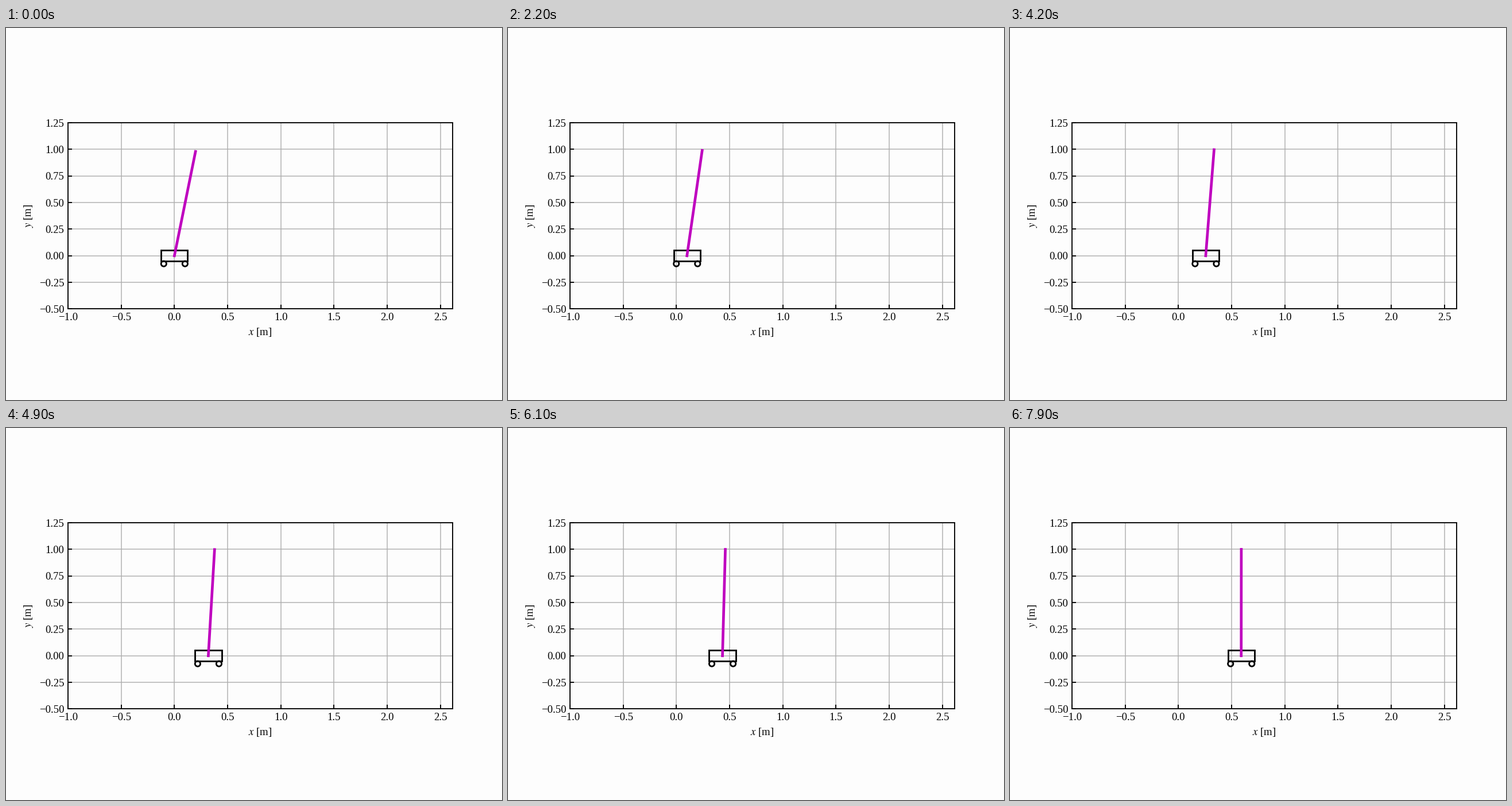
A matplotlib script that plays this animation: 864 px wide and 648 px high, repeating every 8 s.

```python
import numpy as np
import matplotlib.pyplot as plt
from matplotlib.animation import FuncAnimation
from matplotlib.patches import Circle, Rectangle

plt.rcParams.update({
    "font.family": "Liberation Serif",
    "mathtext.fontset": "stix",
    "font.size": 10,
    "axes.linewidth": 1.0,
    "xtick.direction": "in",
    "ytick.direction": "in",
    "xtick.major.width": 1.0,
    "ytick.major.width": 1.0,
})

FRAMES, STEP = 80, 100
PAPER = "#fdfdfd"
CART_W, CART_H = 0.25, 0.1
WHEEL_R, WHEEL_DX = 0.025, 0.1
START_ANGLE = 0.2

# Both coordinates start at rest: value = start + t^2 * cubic(t)
KNOT_T = np.array([1.3, 3.0, 4.2, 4.9, 6.1, 7.9])
KNOT_X = np.array([0.0425, 0.156, 0.258, 0.322, 0.430, 0.591])
KNOT_ANGLE = np.array([0.174, 0.118, 0.0775, 0.057, 0.029, 0.0005])


def from_rest(start, values):
    coef = np.polyfit(KNOT_T, (values - start) / KNOT_T**2, 3, w=KNOT_T)
    return lambda t: start + t**2 * np.polyval(coef, t)


cart_x = from_rest(0.0, KNOT_X)
pole_angle = from_rest(START_ANGLE, KNOT_ANGLE)

fig, ax = plt.subplots(figsize=(6.4, 4.8), dpi=135, facecolor=PAPER)
ax.set_facecolor(PAPER)
ax.set_aspect("equal")
ax.set_xlim(-1.0, 2.613)
ax.set_ylim(-0.5, 1.25)
ax.set_xticks(np.arange(-1.0, 2.6, 0.5))
ax.set_yticks(np.arange(-0.5, 1.3, 0.25))
ax.set_xlabel("$x$ [m]")
ax.set_ylabel("$y$ [m]")
ax.grid(True)

outline = dict(fill=False, edgecolor="black", linewidth=1.5, zorder=2)
body = ax.add_patch(Rectangle((0, -CART_H / 2), CART_W, CART_H, **outline))
wheels = [ax.add_patch(Circle((0, 0), WHEEL_R, **outline)) for _ in range(2)]
pole, = ax.plot([], [], color="#bf00bf", linewidth=2.5,
                solid_capstyle="projecting", zorder=3)


def update(i):
    t = i * STEP / 1000
    x, angle = cart_x(t), pole_angle(t)
    body.set_x(x - CART_W / 2)
    for wheel, side in zip(wheels, (-1, 1)):
        wheel.center = x + side * WHEEL_DX, -CART_H / 2 - WHEEL_R
    pole.set_data([x, x + np.sin(angle)], [0, np.cos(angle)])
    return [body, *wheels, pole]


anim = FuncAnimation(fig, update, frames=FRAMES, interval=STEP,
                     repeat=True, repeat_delay=0)
plt.show()
```
